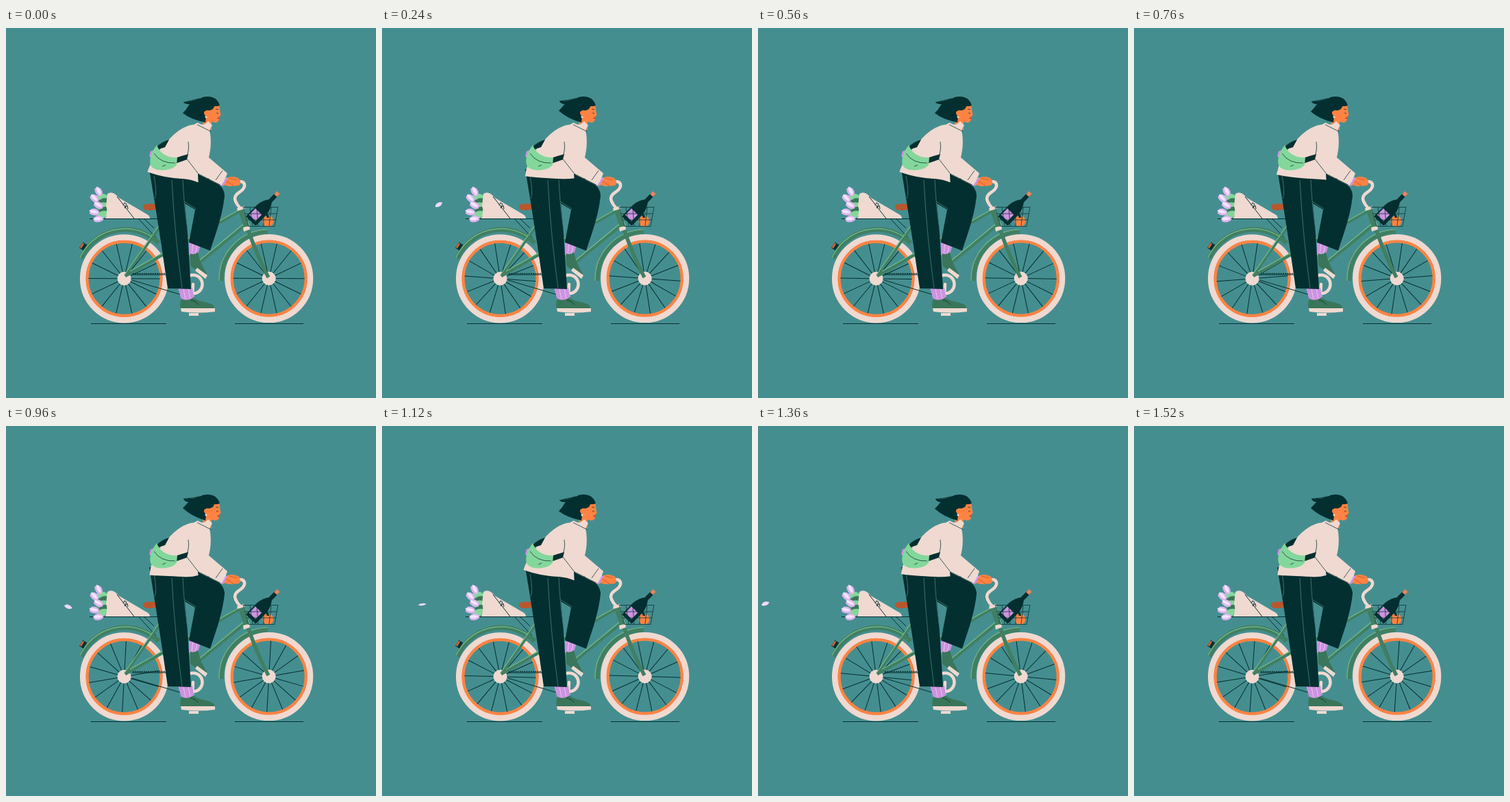
Write an HTML page that moves like this. It is 540 by 540 pixels and loops after 1560 ms.

```html
<!DOCTYPE html>
<html lang="en">
<head>
<meta charset="utf-8">
<title>Bike ride</title>
<style>
html, body { margin: 0; width: 100%; height: 100%; overflow: hidden; background: #458e90; }
svg { display: block; width: 100vw; height: 100vh; }
path { stroke-linejoin: round; }
.dark { fill: #042f30; } .cream { fill: #efd9d0; } .green { fill: #3a7659; }
.mint { fill: #83d79b; } .orange { fill: #ff8342; } .lilac { fill: #cd93df; }
.line { fill: none; stroke: #042f30; stroke-width: 1; }
.thin { stroke-width: .75; }
.tube { fill: none; stroke: #417f62; stroke-width: 4.5; }
.fender { stroke-width: 7; }
.stay { stroke-width: 3.5; }
.shine { fill: none; stroke: #76bd8d; stroke-width: 1.2; }
.bar { fill: none; stroke: #efd9d0; stroke-width: 4.5; stroke-linecap: round; }
.crease { fill: none; stroke: #4b8078; stroke-width: .8; }
.knit { fill: none; stroke: #f0cdf3; stroke-width: .8; }
</style>
</head>
<body>
<svg viewBox="0 0 540 540">
  <defs>
    <g id="wheel">
      <circle r="60.200" fill="none" stroke="#efd9d0" stroke-width="8.800"/>
      <circle r="54" fill="none" stroke="#ff8342" stroke-width="4.200"/>
      <g class="spin"></g>
      <circle r="10" class="cream"/>
    </g>
    <g id="tulip">
      <path d="M-8-5C-3-9 5-8 9-3L10 3C5 7-3 7-8 4L-10 2Z" fill="#dcb5ef"/>
      <path d="M-11-3C-4-6 3-5 8 0C2 3-5 3-11-3Z" fill="#f5e5fb"/>
    </g>
    <path id="leaf" d="M0 0C5-8 13-9 21-3C14 5 7 6 0 0Z"/>
    <path id="petal" d="M-6 1C-4-4 2-4 6-1C4 3-2 4-6 1Z" fill="#f0d9f7"/>
  </defs>

  <path class="line" d="M124 431.500H234M334 431.500H434"/>
  <use href="#wheel" x="172.500" y="365.800"/>
  <use href="#wheel" x="383.700" y="365.500"/>

  <!-- rack and flowers -->
  <path class="line" d="M122 278.500H226M186 264L216 292M193 278L219 306"/>
  <g id="bouquet"></g>
  <path class="cream" d="M148 242Q154 238 160 243L165 248L206 272Q210 274 210 278H145Q149 266 146 260Z"/>
  <path class="line" d="M162 246L187 278M171 259l2-4 3 2-3 6 4-4 1 5"/>
  <path d="M200 259C206 255 214 257 221 257V265C213 265 207 268 201 264Z" fill="#b8572e"/>

  <!-- fenders, chain and frame -->
  <path class="tube fender" d="M110 336A70 70 0 0 1 223 314"/>
  <path class="shine" d="M108 335A72 72 0 0 1 215 306"/>
  <path class="tube fender" d="M314 369A70 70 0 0 1 382 297"/>
  <path class="shine" d="M311 369A73 73 0 0 1 382 294"/>
  <g transform="translate(113 319) rotate(-58)">
    <path class="dark" d="M-5-4H5V3H-5Z"/>
    <path d="M-4-4H4V-1H-4Z" fill="#cb5d35"/>
  </g>
  <path class="line" d="M185 358.500H250" stroke-dasharray="2 1.200" style="stroke-width:1.600"/>
  <path class="line" d="M184 360H250M184 368L258 390"/>
  <path class="tube stay" d="M174 362L228 285"/>
  <path class="tube" d="M174 362L341 267M280 344L350 287"/>
  <path class="shine" d="M173 360L226 284M181 355L339 266M279 342L348 285"/>
  <circle cx="273" cy="374" r="13.500" class="bar"/>
  <path class="bar" d="M273 374L271 411"/>
  <path class="tube" d="M342 263L352 292" style="stroke-width:8"/>
  <path class="tube" d="M351 288Q367 334 383 364" style="stroke-width:5.500"/>
  <path class="shine" d="M346 263L356 292"/>
  <path class="cream" d="M346 291l9-2 1 5-9 3zM337 263l10-3 1 4-10 3z"/>
  <path class="bar" d="M333 226C342 222 349 224 348 231C346 240 334 240 334 249Q335 256 342 263"/>

  <!-- basket -->
  <g transform="translate(360 279) rotate(-46)">
    <path class="dark" d="M-4-10H19Q29-9 37-3H53V3H37Q29 9 19 10H-4Z"/>
    <path class="lilac" d="M1-8H14V5H1Z"/>
    <path d="M48-3h6v6h-6z" fill="#e6865f"/>
  </g>
  <circle class="orange" cx="382.500" cy="282" r="8"/>
  <path class="dark" d="M379 272q4-3 5 5h-3z"/>
  <path class="line thin" d="M346 261.500H397L392 289.500H354ZM348 271H395M351 280H394M356 262L360 289M366 262L368 289M376 262V289M387 262L384 289"/>

  <!-- far leg -->
  <path class="lilac" d="M267 312L284 317L279 333L267 331Z"/>
  <path class="knit" d="M273 314l-2 17M279 317l-3 15"/>
  <path class="green" d="M269 329Q275 332 280 327L284 342L293 359L285 359L269 347Z"/>
  <path class="cream" d="M279 350L294 361L291 366L276 354Z"/>
  <path class="dark" d="M250 208H281L300 221Q319 231 319 245C316 274 306 300 298 325L267 313L276 265L254 252Z"/>
  <path class="crease" d="M260 253L277 264"/>

  <!-- near leg -->
  <path class="lilac" d="M251 379H272L275 397Q263 402 256 397Z"/>
  <path class="knit" d="M259 381l3 15M266 381l3 14"/>
  <path class="green" d="M256 395Q264 400 274 393C281 402 304 398 305 410H255Q253 402 256 395Z"/>
  <path class="line thin" d="M270 397Q278 399 281 404"/>
  <path class="cream" d="M255 409H305V414Q280 417 256 414ZM267 416H281V420H267Z"/>
  <path class="dark" d="M209 206L258 212C259 240 263 272 265 300L270 381L236 380Q224 295 209 206Z"/>
  <path class="crease" d="M242 222Q246 300 257 380M216 216Q221 241 217 249M258 221Q260 262 265 294"/>

  <!-- rider -->
  <path class="orange" d="M318 221C325 216 334 216 340 220Q344 226 340 230L326 231L317 229Z"/>
  <path class="thin" fill="none" stroke="#b8532e" d="M321 223L332 230M326 219l11 3"/>
  <path class="lilac" d="M313 217l11 2-7 12-8-4z"/>
  <path class="orange" d="M290 118L311 110L312 119L313.500 127L311 130Q312 137 306 138L300 137V149L287 142Z"/>
  <path class="cream" id="jacket"/>
  <path class="line thin" id="seam"/>
  <path class="line thin" d="M266 166Q268 178 263 190M279 141L299 151M306 222L316 208"/>
  <circle class="line thin" cx="295" cy="221" r="1.200"/>
  <path class="lilac" d="M211 180l5-2-2 14-5-5z"/>
  <path class="dark" d="M219 174Q229 165 238 163L232 174L219 178ZM246 190L266 184L264 192L247 198Z"/>
  <path class="mint" d="M220 171C212 181 207 196 213 203C220 210 241 209 249 200L250 189C237 190 225 184 220 171Z"/>
  <path class="line thin" d="M216 183Q226 198 247 197M228 202l5-2"/>
  <path class="dark" id="hair"/>
  <path class="line" id="strand"/>
  <circle cx="292" cy="124" r="3" class="orange"/>
  <path class="line thin" d="M306 119q2-1 4 0M307 124q2 1 3 0"/>
  <path d="M308 131l4-1-2 3z" fill="#b63c35"/>
  <circle cx="292" cy="130" r="1.500" class="cream"/>
  <g id="petals"></g>
</svg>
<script>
const LOOP = 1560, GUST = 560, SPOKES = 14;
const $ = id => document.getElementById(id);
const setPath = (id, d) => $(id).setAttribute("d", d);
const repeat = (n, make) => Array.from({ length: n }, (_, i) => make(i)).join("");

const petals = [
  { launch: 30, life: 530, height: 267, sway: 13, phase: -2.9 },
  { launch: 790, life: 590, height: 261, sway: 3, phase: 0 }
];

const spin = document.querySelector(".spin");
spin.innerHTML = repeat(SPOKES, i =>
  `<path class="line" d="M8 0H52" transform="rotate(${i * 360 / SPOKES})"/>`);
$("petals").innerHTML = repeat(petals.length, () => `<use href="#petal"/>`);
$("bouquet").innerHTML =
  repeat(5, i => `<use href="#leaf" class="${i % 2 ? "green" : "mint"}"
    transform="translate(${131 + i % 2 * 3} ${246 + i * 8}) rotate(${15 - i * 9})"/>`) +
  repeat(5, i => `<use href="#tulip"
    transform="translate(${135 - i % 2 * 6} ${239 + i * 10}) rotate(${55 - i * 17}) scale(.72)"/>`);

function drawRider(t) {
  const lift = Math.cos((t - 340) / GUST * 2 * Math.PI);
  const tipY = 107.5 - 1.5 * lift, lobeY = 122 - 3 * lift;
  const back = 214 + 5 * lift, front = 221.5 - 5 * lift;

  setPath("hair", `M312 113C309 101 297 98 287 101C279 105 272 107 259 ${tipY}
    Q261 111 ${267 - lift} 111Q263 ${lobeY - 5} 258 ${lobeY}
    Q270 ${132.5 - 1.5 * lift} 291 138L292 131
    Q287 122 293 120C299 121 303 119 304 114Q308 115 312 113Z`);
  setPath("strand", `M259 ${tipY}Q270 106 283 103`);
  setPath("jacket", `M280 138Q288 145 295 136L301 142Q296 149 298 154
    C300 170 298 180 296 189L323 212Q320 222 314 230L280 213L281 ${front}
    Q270 221 258 220Q231 219 ${208 + 2 * lift} ${back}C212 193 222 179 236 165
    C246 153 260 142 274 141Z`);
  setPath("seam", `M263 190L281 213L313 229M281 213V${front}`);
}

function drawPetal(node, { launch, life, height, sway, phase }, t) {
  const age = t - launch, turn = age / 100;
  node.style.display = age > 0 && age < life ? "" : "none";
  const x = 125 - 0.2 * age;
  const y = height + sway * Math.sin(turn + phase);
  const angle = 26 * Math.sin(turn + phase * 1.4);
  const flat = 0.75 + 0.25 * Math.cos((age - 200) / 55);
  node.setAttribute("transform", `translate(${x} ${y}) rotate(${angle}) scale(1 ${flat})`);
}

function draw(t) {
  spin.setAttribute("transform", `rotate(${t / LOOP * 360})`);
  drawRider(t);
  petals.forEach((petal, i) => drawPetal($("petals").children[i], petal, t));
}

const start = performance.now();
function frame() {
  draw((performance.now() - start) % LOOP);
  requestAnimationFrame(frame);
}
draw(0);
requestAnimationFrame(frame);
</script>
</body>
</html>
```
